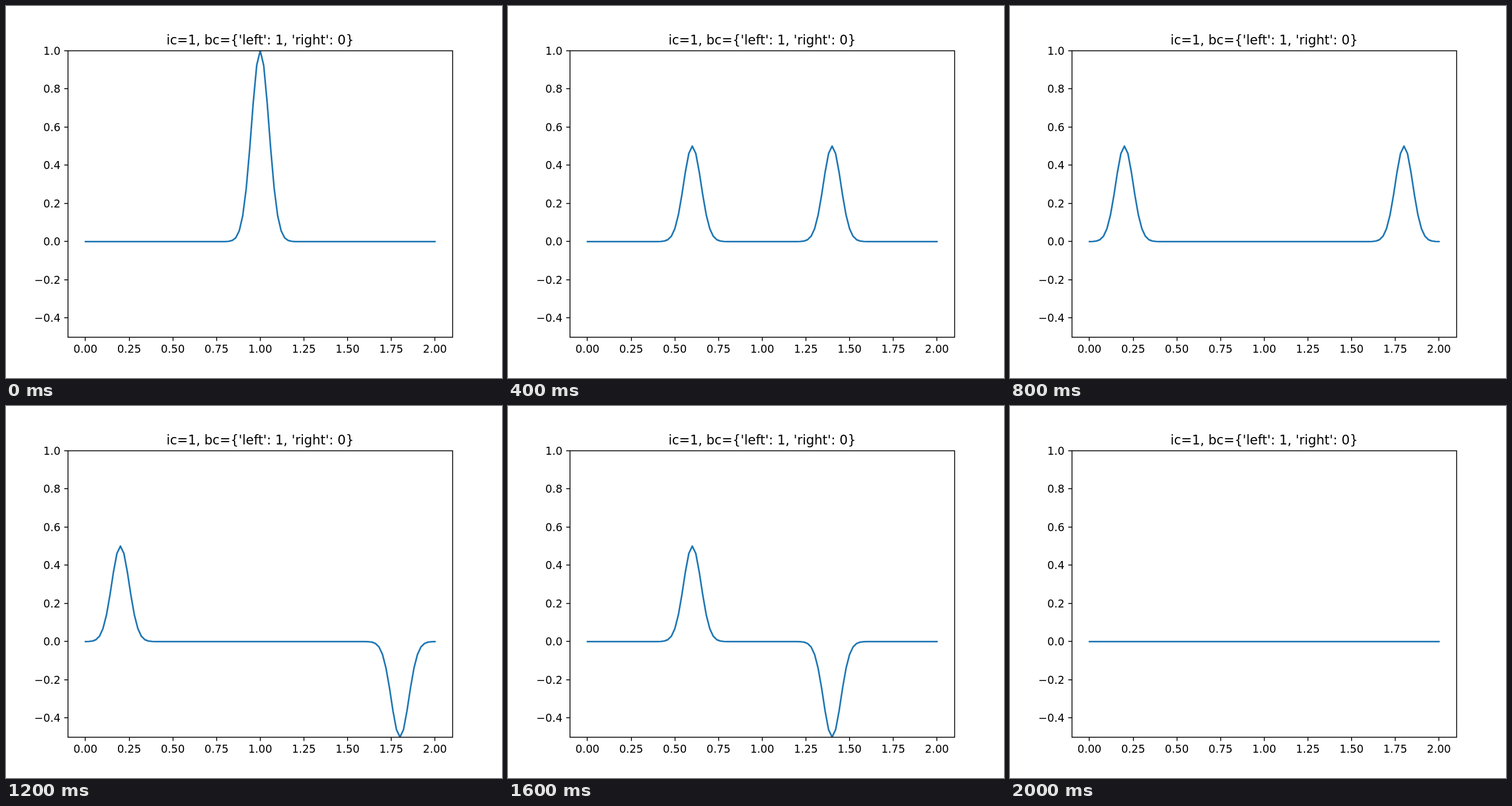
An HTML page for the animation above (2200 ms loop, 864 by 648 pixels).

```html
<!DOCTYPE html>
<html lang="en">
<head>
<meta charset="utf-8">
<title>Wave on a string</title>
<style>
  html, body { margin: 0; width: 100%; height: 100%; overflow: hidden; background: #fff; }
  svg { display: block; width: 864px; height: 648px; }
  text { font: 18.75px "DejaVu Sans", sans-serif; fill: #000; }
  .title { font-size: 22.5px; }
  .axes { fill: none; stroke: #000; stroke-width: 1.5; }
  .wave { fill: none; stroke: #1f77b4; stroke-width: 2.8125; stroke-linecap: square; stroke-linejoin: round; }
</style>
</head>
<body>
<svg viewBox="0 0 864 648">
  <clipPath id="plot"><rect x="108" y="78" width="670" height="499"/></clipPath>
  <g clip-path="url(#plot)"><path class="wave" id="wave"/></g>
  <path class="axes" id="ticks"/>
  <rect class="axes" x="108" y="78" width="670" height="499"/>
  <g id="labels"></g>
  <text class="title" x="442.8" y="66.5" text-anchor="middle">ic=1, bc={'left': 1, 'right': 0}</text>
</svg>
<script>
const LOOP = 2200, STEP = 200, POINTS = 100;
const px = x => 108 + (x + 0.1) * 669.6 / 2.2;
const py = y => 77.76 + (1 - y) * 332.64;
const $ = id => document.getElementById(id);

function label(str, x, y, anchor) {
  const el = document.createElementNS('http://www.w3.org/2000/svg', 'text');
  el.setAttribute('x', x);
  el.setAttribute('y', y);
  el.setAttribute('text-anchor', anchor);
  el.textContent = str;
  $('labels').append(el);
}

function drawTicks() {
  let d = '';
  for (let i = 0; i <= 8; i++) {
    const x = px(i / 4);
    d += `M${Math.round(x)} 577v6.56`;
    label((i / 4).toFixed(2), x, 604, 'middle');
  }
  for (let i = -2; i <= 5; i++) {
    const y = Math.round(py(i / 5));
    d += `M108 ${y}h-6.56`;
    label((i / 5).toFixed(1).replace('-', '\u2212'), 94.9, y + 7, 'end');
  }
  $('ticks').setAttribute('d', d);
}

const pulse = d => Math.exp(-200 * d * d) / 2;

// Two travelling pulses plus their mirror images: free left end, fixed right end.
const height = (x, t) =>
  pulse(x - 1 + t) + pulse(x + 1 - t) + pulse(x - 1 - t) - pulse(x - 3 + t);

function draw(ms) {
  const t = Math.floor(ms % LOOP / STEP) * STEP / 1000;
  let d = '';
  for (let i = 0; i <= POINTS; i++) {
    const x = 2 * i / POINTS;
    d += `${i ? 'L' : 'M'}${px(x).toFixed(2)} ${py(height(x, t)).toFixed(2)}`;
  }
  $('wave').setAttribute('d', d);
}

drawTicks();
const start = performance.now();
function tick() {
  draw(performance.now() - start);
  requestAnimationFrame(tick);
}
tick();
</script>
</body>
</html>
```
